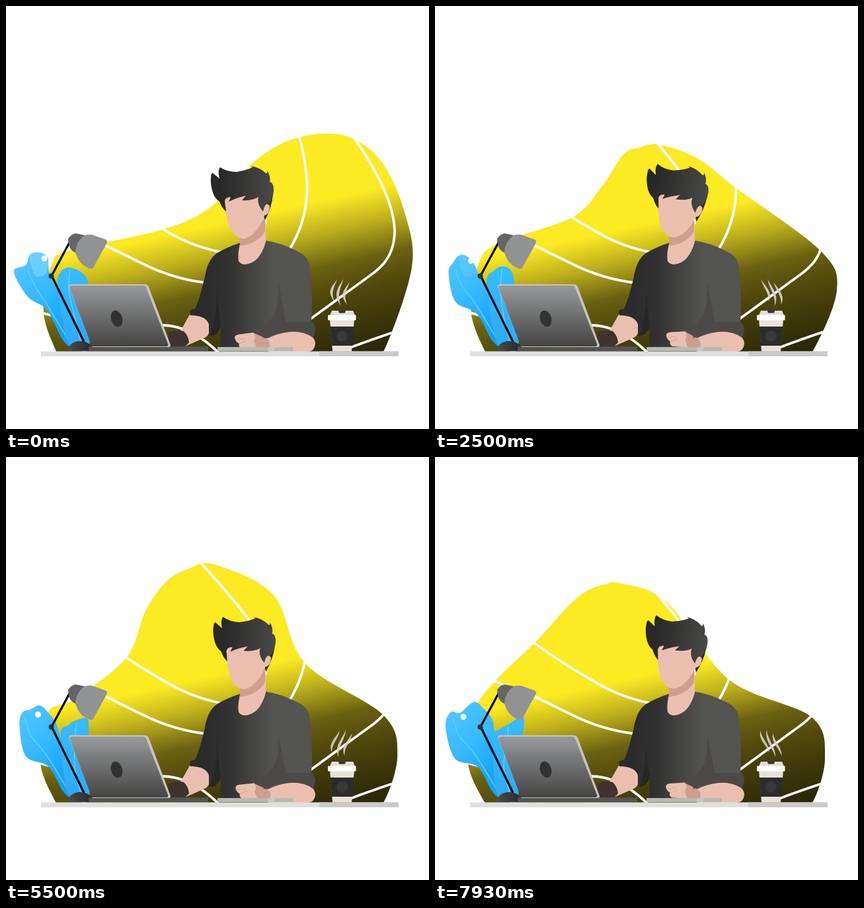
Animation of 640 by 640 pixels, one loop 8000 ms. Source, as an HTML page:

```html
<!DOCTYPE html>
<html lang="en">
<head>
<meta charset="utf-8">
<title>Desk</title>
<style>
html, body { margin: 0; width: 100%; height: 100%; overflow: hidden; background: #fff; }
svg { display: block; width: 100%; height: 100%; }
</style>
</head>
<body>
<svg viewBox="0 0 640 640">
  <defs>
    <linearGradient id="gold" gradientUnits="userSpaceOnUse" x1="300" y1="334" x2="352" y2="569">
      <stop offset="0" stop-color="#fcea23"/><stop offset=".2" stop-color="#bcae1c"/>
      <stop offset=".41" stop-color="#6a6110"/><stop offset=".6" stop-color="#4f480c"/><stop offset="1" stop-color="#2a2606"/>
    </linearGradient>
    <linearGradient id="shirt" gradientUnits="userSpaceOnUse" x1="300" y1="0" x2="405" y2="0">
      <stop offset="0" stop-color="#2b2b2b"/><stop offset=".35" stop-color="#323232"/><stop offset="1" stop-color="#545450"/>
    </linearGradient>
    <linearGradient id="hair" gradientUnits="userSpaceOnUse" x1="325" y1="0" x2="410" y2="0">
      <stop offset="0" stop-color="#282828"/><stop offset="1" stop-color="#4b4b49"/>
    </linearGradient>
    <linearGradient id="lid" x2="0" y2="1">
      <stop offset="0" stop-color="#97999b"/><stop offset="1" stop-color="#454443"/>
    </linearGradient>
    <linearGradient id="leafA" gradientUnits="userSpaceOnUse" x1="18" y1="395" x2="95" y2="490">
      <stop offset="0" stop-color="#4dc4ff"/><stop offset=".45" stop-color="#35b9ff"/><stop offset="1" stop-color="#139ff8"/>
    </linearGradient>
    <linearGradient id="leafB" gradientUnits="userSpaceOnUse" x1="105" y1="395" x2="100" y2="520">
      <stop offset="0" stop-color="#35bcff"/><stop offset="1" stop-color="#2fa9f4"/>
    </linearGradient>
    <linearGradient id="foot"><stop offset="0" stop-color="#4d4d4d"/><stop offset="1" stop-color="#262626"/></linearGradient>
    <clipPath id="aboveDesk"><path d="M0 0H640V523H0Z"/></clipPath>
    <clipPath id="inBlob"><path id="blobClip"/></clipPath>
  </defs>

  <g clip-path="url(#aboveDesk)">
    <path id="blob" fill="url(#gold)"/>
    <g clip-path="url(#inBlob)" fill="none" stroke="#fff" stroke-width="3.8">
      <path d="M90 235Q170 300 238 338Q290 370 350 376"/>
      <path d="M280 144L294 159Q345 216 368 247Q388 278 393 330"/>
      <path d="M440 184C461 255 464 312 428 370"/>
      <path d="M520 190C555 239 587 294 588 340C588 385 560 401 545 412L460 474"/>
      <path d="M610 486Q565 500 515 519"/>
      <path d="M70 332Q110 346 150 362L205 389Q252 413 305 419"/>
      <path d="M40 460Q140 491 235 483Q280 483 322 525"/>
    </g>
  </g>

  <path id="leftLeaf" fill="url(#leafA)"/>
  <path id="cap" fill="#7dd4ff"/>
  <path id="leftVein" fill="none" stroke="#5fd2ff" stroke-width="1.5"/>
  <path id="rightLeaf" fill="url(#leafB)"/>
  <path id="rightVein" fill="none" stroke="#63d0ff" stroke-width="1.5"/>
  <circle id="bite" r="4.5" fill="#fff"/>

  <path d="M118 508L69 408L97 356" fill="none" stroke="#000" stroke-width="3.2"/>
  <circle cx="68.5" cy="408.5" r="4" fill="#303030"/>
  <path d="M94 352Q99 345 105 344L120 347L107 374Q94 370 94 352Z" fill="#656567"/>
  <path d="M105 373Q106 356 119 347Q124 345 130 346L150 353Q154 355 153 358L132 396Q130 399 126 397Q110 391 105 373Z" fill="#919294"/>
  <path d="M92 522Q97 507 112 507Q128 507 133 522Z" fill="url(#foot)"/>

  <!-- person -->
  <path d="M279 465L302 466L308 480V491Q307 500 298 503L273 514L261 497Z" fill="#ebbfb0"/>
  <path d="M246 494Q258 489 269 492Q276 499 277 509Q272 516 262 515L246 516Z" fill="#3f322f"/>
  <path d="M355 358Q334 365 319 374Q305 384 301 409Q293 444 286 458L279 460Q277 464 279 468Q303 468 307 482V499Q317 501 325 486L324 522H462V478Q465 440 459 390Q456 378 441 371Q415 358 393 355Z" fill="url(#shirt)"/>
  <path d="M320 430Q321 462 325 486Q318 500 309 499Q318 482 320 430Z" fill="#262626"/>
  <path d="M412 418L423 478Q402 488 393 502Q383 499 376 494Q408 476 411 450Z" fill="#4c4946"/>
  <path d="M354 340V359Q350 378 352 386Q355 391 362 391Q384 389 393 357V325Z" fill="#ebbfb0"/>
  <path d="M354 348Q382 346 392 316V341Q380 360 354 363Z" fill="#cf9f8d"/>

  <g id="head">
    <path d="M386 296L404 285Q402 305 392 324L389 315Z" fill="#2e2e2e"/>
    <path d="M331 288Q331 316 339 337Q348 352 361 352Q379 347 391 317Q399 315 399 303Q396 297 390 301L383 284Z" fill="#ebbfb0"/>
    <path d="M310 260Q310 252 313 253L323 261Q320 248 324 244Q334 251 349 251Q363 249 373 244L370 242Q384 244 393 253Q396 254 395 249Q401 258 399 266Q405 267 405 279Q404 291 398 299Q391 298 389 311Q379 300 382 289Q372 295 357 294L363 287Q349 290 337 296L340 289Q332 289 331 295L333 311Q327 306 323 296Q315 291 312 279Q309 268 310 260Z" fill="url(#hair)"/>
  </g>

  <path d="M378 500Q393 506 402 500Q428 490 447 494Q468 498 468 511Q467 522 457 523H398L371 513Z" fill="#ebbfb0"/>
  <g id="hand">
    <path d="M373 494Q386 499 397 505Q401 511 398 518H373Z" fill="#cf9f8d"/>
    <path d="M346 502Q346 498 352 497L374 494Q379 500 375 507L380 518H356Q351 515 353 511Q347 508 346 502Z" fill="#ebbfb0"/>
    <path d="M347 505L361 503M353 511L364 506" fill="none" stroke="#d5a593"/>
  </g>
  <path d="M389 503Q404 484 424 478H463Q468 482 468 491L465 502Q446 489 420 494Q401 498 389 503Z" fill="#4c4a47"/>

  <!-- laptop, desk, cup -->
  <path d="M125 515H306V522H125Z" fill="#545353"/>
  <path d="M95 425Q95 421 100 421H210Q214 421 216 425L249 513Q249 516 246 516H131Z" fill="#c7c3bf"/>
  <path d="M96 426Q96 423 100 423H207Q211 423 212 426L245 511Q246 515 242 515H130Z" fill="url(#lid)"/>
  <ellipse cx="167.5" cy="473" rx="8.5" ry="12.5" transform="rotate(-17 167.5 473)" fill="#333232"/>
  <path d="M320 516H434V522H320Z" fill="#b9b8b4"/>
  <path d="M398 516H408L405 522H395Z" fill="#c9c8c4"/>
  <path d="M53 522.5H594V530H53Z" fill="#dfdfdf"/>
  <path d="M474 522.5H594V530H474Z" fill="#cacaca"/>

  <path d="M490 468L493 461H525L528 468Z" fill="#e6dfd7"/>
  <path d="M503 461H514L513 464.5H504Z" fill="#333"/>
  <path d="M490 474H527L523 522.5H494Z" fill="#e9e2d8"/>
  <path d="M490.5 485H526.5L524.5 514H493Z" fill="#2c2c2c"/>
  <rect x="487" y="467.5" width="42.5" height="8" rx="1" fill="#fff"/>
  <circle cx="508.5" cy="499.5" r="8.5" fill="#393939"/>
  <path id="steam" fill="#d6d0c6" fill-opacity=".92"/>
</svg>
<script>
const LOOP = 8000;
const $ = id => document.getElementById(id);
const setD = (id, d) => $(id).setAttribute('d', d);
const f = v => v.toFixed(2);
const points = s => s.split(' ').map(p => p.split(',').map(Number));

// A track holds a few key outlines; points glide between them.
const track = (times, bend, ...rows) => ({ times, bend, rows: rows.map(points) });

const hill = track([0, 1290, 2500, 6030, 7930], 0.8,
  '97,370 238,338 310,304 367,243 422,206 483,193 530,203 572,241 603,312 614,395',
  '97,361 222,327 268,294 325,243 365,230 408,225 465,234 530,263 587,328 610,420',
  '97,359 207,320 252,274 285,225 310,214 340,210 398,231 455,275 583,370 608,430',
  '106,367 179,301 206,226 238,182 272,163 311,156 405,205 452,317 569,393 590,455',
  '92,338 152,280 205,222 235,200 257,193 279,191 350,219 445,337 569,393 590,455');

const sway = [0, 3500, 7930];
const leafL = track(sway, 1,
  '62,460 33,440 12,402 30,392 36,377 50,373 63,381 67,408',
  '64,468 30,450 24,405 26,387 36,378 46,380 57,393 68,410',
  '65,469 30,456 16,408 24,386 38,387 58,371 73,380 88,402');
const leafR = track(sway, 1,
  '78,425 84,401 98,396 115,404 124,418',
  '78,418 92,400 104,393 115,399 118,416',
  '88,425 98,412 112,404 132,392 134,412');
const nibble = track(sway, 1, '58,382', '53,387', '43,393');

function pose({ times, bend, rows }, t) {
  let i = 0;
  while (i < times.length - 2 && t > times[i + 1]) i++;
  const k = Math.min(1, (t - times[i]) / (times[i + 1] - times[i])) ** bend;
  return rows[i].map((p, n) => p.map((v, axis) => v + (rows[i + 1][n][axis] - v) * k));
}

// Catmull-Rom spline as cubic segments
function spline(p, closed) {
  const n = p.length;
  const at = i => closed ? p[(i + n) % n] : p[Math.max(0, Math.min(n - 1, i))];
  let d = `M${f(p[0][0])} ${f(p[0][1])}`;
  for (let i = 0; i < (closed ? n : n - 1); i++) {
    const [a, b, c, e] = [at(i - 1), at(i), at(i + 1), at(i + 2)];
    d += 'C' + [b[0] + (c[0] - a[0]) / 6, b[1] + (c[1] - a[1]) / 6,
                c[0] - (e[0] - b[0]) / 6, c[1] - (e[1] - b[1]) / 6, c[0], c[1]].map(f).join(' ');
  }
  return closed ? d + 'Z' : d;
}

// Tapered stroke along a wave that climbs with time
function wisp(x, top, bottom, t) {
  const left = [], right = [];
  for (let i = 0; i <= 8; i++) {
    const v = i / 8;
    const mid = x - 6.5 * Math.cos(2 * Math.PI * (0.5 * (v - 0.6) + t / 6250));
    const w = 2.1 * Math.sin(Math.PI * v);
    const y = top + (bottom - top) * v;
    left.push([mid - w, y]);
    right.unshift([mid + w, y]);
  }
  return spline(left) + spline(right).replace('M', 'L') + 'Z';
}

function draw(t) {
  const u = t / LOOP;

  const d = spline([[79, 530], [57 - 7 * u, 465], [69 - 10 * u, 392 - 6 * u],
                    ...pose(hill, t), [571, 523], [540, 545]]) + 'Z';
  setD('blob', d);
  setD('blobClip', d);

  const l = pose(leafL, t);
  setD('leftLeaf', spline([[112, 522], [88, 508], ...l, [92, 455], [118, 508]], true));
  setD('leftVein', spline([[l[3][0] + 3, l[3][1] + 8], [l[3][0] + 13, 422], [62, 452], [96, 508]]));
  setD('cap', spline([l[4], l[5], l[6], [l[7][0] - 6, 404], [l[4][0] + 8, 408]], true));
  $('cap').setAttribute('opacity', f(0.7 * Math.max(0, 1 - t / 4200)));

  const r = pose(leafR, t);
  setD('rightLeaf', spline([[112, 522], [92, 505], ...r, [124, 450], [126, 515]], true));
  setD('rightVein', spline([[r[2][0] - 1, r[2][1] + 4], [r[2][0] - 3, 430], [104, 470], [113, 508]]));

  const [[bx, by]] = pose(nibble, t);
  $('bite').setAttribute('cx', f(bx));
  $('bite').setAttribute('cy', f(by));

  const nod = Math.abs(Math.sin(Math.PI * t / 4800)) ** 1.3;
  $('head').setAttribute('transform', `rotate(${f(6.6 * nod)} 375 355)`);
  $('hand').setAttribute('transform', `translate(${f(3 * nod)} 0) rotate(${f(4.6 * nod)} 395 510)`);

  setD('steam', wisp(499, 414, 447, t) + wisp(508.5, 413, 454, t) + wisp(518, 418, 452, t));
}

const start = performance.now();
function tick() {
  draw((performance.now() - start) % LOOP);
  requestAnimationFrame(tick);
}
tick();
</script>
</body>
</html>
```
